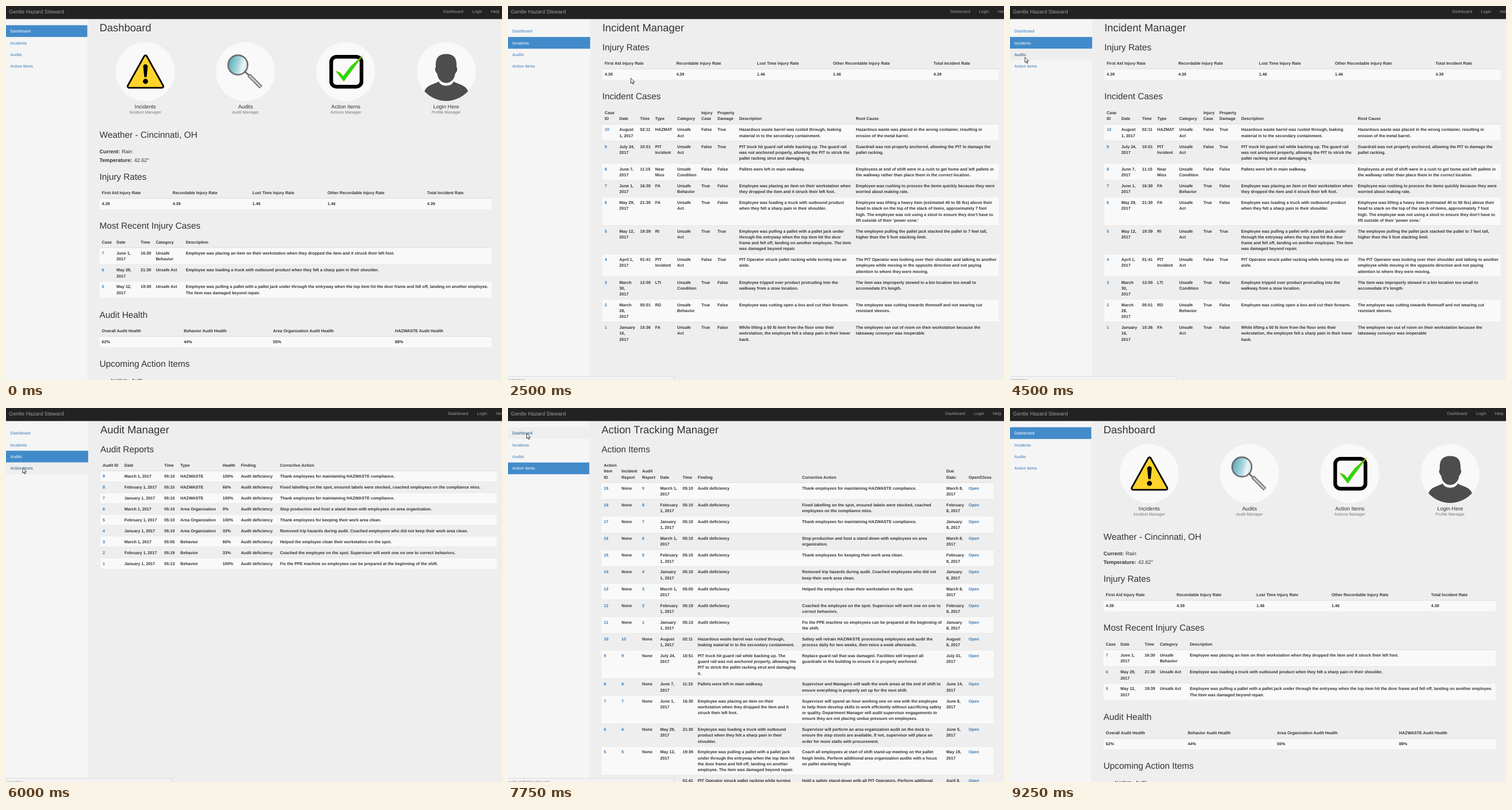
An HTML page with a canvas that plays this animation: 862 px wide and 650 px high, repeating every 9500 ms.

```html
<!DOCTYPE html>
<html lang="en">
<head>
<meta charset="utf-8">
<title>Dashboard</title>
<style>
html, body { margin: 0; width: 100%; height: 100%; overflow: hidden; background: #eee; }
canvas { display: block; }
</style>
</head>
<body>
<canvas id="stage" width="862" height="650"></canvas>
<script>
const ctx = document.getElementById('stage').getContext('2d');
const S = 0.5107, LINE = 20 * S, TICK = 250, LOOP = 9500;
const INK = '#333', LINK = '#337ab7', MUTED = '#777', STRIPE = '#f9f9f9';
const SANS = '"Liberation Sans", Arial, sans-serif';

// y is the middle of the capitals
function text(str, x, y, { size = 14, bold = false, color = INK, align = 'left', face = SANS } = {}) {
  ctx.save();
  ctx.translate(x, y + size * S * 0.358);
  ctx.scale(S, S);
  ctx.font = `${bold ? 'bold ' : ''}${size}px ${face}`;
  ctx.textRendering = 'geometricPrecision';
  ctx.textAlign = align;
  ctx.fillStyle = color;
  ctx.fillText(str, 0, 0);
  ctx.restore();
}

function rect(x, y, w, h, color) {
  ctx.fillStyle = color;
  ctx.fillRect(x, y, w, h);
}

function disc(x, y, r, color) {
  ctx.fillStyle = color;
  ctx.beginPath();
  ctx.arc(x, y, r, 0, Math.PI * 2);
  ctx.fill();
}

function poly(points) {
  ctx.beginPath();
  points.forEach(([x, y]) => ctx.lineTo(x, y));
  ctx.closePath();
}

function paint(fill, stroke, width) {
  if (fill) { ctx.fillStyle = fill; ctx.fill(); }
  if (stroke) { ctx.strokeStyle = stroke; ctx.lineWidth = width; ctx.stroke(); }
}

const h1 = (str, x) => text(str, x, 37.8, { size: 36 });
const h2 = (str, x, y) => text(str, x, y, { size: 30 });

// Cells are split by ";" and lines by "|"; y is the last header line
function table(left, right, y, cols, head, rows, links = []) {
  head.split(';').forEach((cell, i) => {
    const lines = cell.split('|');
    lines.forEach((s, k) => text(s, cols[i], y - (lines.length - 1 - k) * LINE, { bold: true }));
  });
  let top = y + 9.6;
  rows.forEach((row, r) => {
    const cells = row.split(';').map(c => c.split('|'));
    const h = (Math.max(...cells.map(c => c.length)) * 20 + 17) * S;
    if (r % 2 === 0) rect(left, top, right - left, h, STRIPE);
    rect(left, top - (r ? 0 : 0.5), right - left, r ? 0.5 : 1, '#ddd');
    cells.forEach((lines, i) => {
      const color = links.includes(i) && lines[0] !== 'None' ? LINK : INK;
      lines.forEach((s, k) => text(s, cols[i], top + 9.7 + k * LINE, { bold: true, color }));
    });
    top += h;
  });
}

const RATES = 'First Aid Injury Rate;Recordable Injury Rate;Lost Time Injury Rate;Other Recordable Injury Rate;Total Incident Rate';
const RATE_ROW = ['4.39;4.39;1.46;1.46;4.39'];

const RECENT = [
  '7;June 1,|2017;16:30;Unsafe|Behavior;Employee was placing an item on their workstation when they dropped the item and it struck their left foot.',
  '6;May 29,|2017;21:30;Unsafe Act;Employee was loading a truck with outbound product when they felt a sharp pain in their shoulder.',
  '5;May 12,|2017;19:39;Unsafe Act;Employee was pulling a pallet with a pallet jack under through the entryway when the top item hit the door frame and fell off, landing on another employee.|The item was damaged beyond repair.'
];

const CASES = [
  '10;August|1, 2017;02:11;HAZMAT;Unsafe|Act;False;True;Hazardous waste barrel was rusted through, leaking|material in to the secondary containment.;Hazardous waste was placed in the wrong container, resulting in|erosion of the metal barrel.',
  '9;July 24,|2017;10:51;PIT|Incident;Unsafe|Act;False;True;PIT truck hit guard rail while backing up. The guard rail|was not anchored properly, allowing the PIT to strick the|pallet racking strut and damaging it.;Guardrail was not properly anchored, allowing the PIT to damage the|pallet racking.',
  '8;June 7,|2017;11:15;Near|Miss;Unsafe|Condition;False;False;Pallets were left in main walkway.;Employees at end of shift were in a rush to get home and left pallets in|the walkway rather than place them in the correct location.',
  '7;June 1,|2017;16:30;FA;Unsafe|Behavior;True;False;Employee was placing an item on their workstation when|they dropped the item and it struck their left foot.;Employee was rushing to process the items quickly because they were|worried about making rate.',
  "6;May 29,|2017;21:30;FA;Unsafe|Act;True;False;Employee was loading a truck with outbound product|when they felt a sharp pain in their shoulder.;Employee was lifitng a heavy item (estimated 40 to 50 lbs) above their|head to stack on the top of the stack of items, approximately 7 foot|high. The employee was not using a stool to ensure they don't have to|lift outside of their 'power zone.'",
  '5;May 12,|2017;19:39;RI;Unsafe|Act;True;True;Employee was pulling a pallet with a pallet jack under|through the entryway when the top item hit the door|frame and fell off, landing on another employee. The item|was damaged beyond repair.;The employee pulling the pallet jack stacked the pallet to 7 feet tall,|higher than the 5 foot stacking limit.',
  '4;April 1,|2017;01:41;PIT|Incident;Unsafe|Act;False;True;PIT Operator struck pallet racking while turning into an|aisle.;The PIT Operator was looking over their shoulder and talking to another|employee while moving in the opposite direction and not paying|attention to where they were moving.',
  "3;March|30,|2017;12:00;LTI;Unsafe|Condition;True;False;Employee tripped over product protruding into the|walkway from a stow location.;The item was improperly stowed in a bin location too small to|accomodate it's length.",
  '2;March|28,|2017;05:01;RD;Unsafe|Behavior;True;False;Employee was cutting open a box and cut their forearm.;The employee was cutting towards themself and not wearing cut|resistant sleeves.',
  '1;January|16,|2017;15:36;FA;Unsafe|Act;True;False;While lifting a 50 lb item from the floor onto their|wokrstation, the employee felt a sharp pain in their lower|back.;The employee ran out of room on their workstation because the|takeaway conveyor was inoperable'
];

const THANKS = 'Thank employees for maintaining HAZWASTE compliance.';
// month, time, type, health, action, action as wrapped in the narrower table
const AUDITS = [
  ['March', '05:10', 'HAZWASTE', '100%', THANKS],
  ['February', '05:10', 'HAZWASTE', '66%', 'Fixed labelling on the spot, ensured labels were stocked, coached|employees on the compliance miss.'],
  ['January', '05:10', 'HAZWASTE', '100%', THANKS],
  ['March', '05:10', 'Area Organization', '0%', 'Stop production and host a stand down with employees on area|organization.'],
  ['February', '05:10', 'Area Organization', '100%', 'Thank employees for keeping their work area clean.'],
  ['January', '05:10', 'Area Organization', '33%', 'Removed trip hazards during audit. Coached employees who did not|keep their work area clean.'],
  ['March', '05:05', 'Behavior', '66%', 'Helped the employee clean their workstation on the spot.'],
  ['February', '05:19', 'Behavior', '33%', 'Coached the employee on the spot. Supervisor will work one on one to|correct behaviors.'],
  ['January', '05:13', 'Behavior', '100%', 'Fix the PPE machine so employees can be prepared at the beginning of|the shift.']
];
const REPORTS = AUDITS.map(([m, time, type, health, act], i) =>
  `${9 - i};${m} 1, 2017;${time};${type};${health};Audit deficiency;${act.replace('|', ' ')}`);

const wrapDate = (m, d) => m === 'March' ? `${m} ${d},|2017` : `${m}|${d}, 2017`;
const ACTIONS = AUDITS.map(([m, time, , , act], i) =>
  `${19 - i};None;${9 - i};${wrapDate(m, 1)};${time};Audit deficiency;${act};${wrapDate(m, 8)};Open`
).concat([
  '10;10;None;August|1, 2017;02:11;Hazardous waste barrel was rusted through,|leaking material in to the secondary containment.;Safety will retrain HAZWASTE processing employees and audit the|process daily for two weeks, then twice a week afterwards.;August|8, 2017;Open',
  '9;9;None;July 24,|2017;10:51;PIT truck hit guard rail while backing up. The|guard rail was not anchored properly, allowing the|PIT to strick the pallet racking strut and damaging|it.;Replace guard rail that was damaged. Facilities will inspect all|guardraile in the building to ensure it is properly anchored.;July 31,|2017;Open',
  '8;8;None;June 7,|2017;11:15;Pallets were left in main walkway.;Supervisor and Managers will walk the work areas at the end of shift to|ensure everything is properly set up for the next shift.;June 14,|2017;Open',
  '7;7;None;June 1,|2017;16:30;Employee was placing an item on their|workstation when they dropped the item and it|struck their left foot.;Supervisor will spend an hour working one on one with the employee|to help them develop skills to work efficiently without sacrificing safety|or quality. Department Manager will audit supervisor engagements to|ensure they are not placing undue pressure on employees.;June 8,|2017;Open',
  '6;6;None;May 29,|2017;21:30;Employee was loading a truck with outbound|product when they felt a sharp pain in their|shoulder.;Supervisor will perform an area organization audit on the dock to|ensure the step stools are available. If not, supervisor will place an|order for more stalls with procurement.;June 5,|2017;Open',
  '5;5;None;May 12,|2017;19:39;Employee was pulling a pallet with a pallet jack|under through the entryway when the top item hit|the door frame and fell off, landing on another|employee. The item was damaged beyond repair.;Coach all employees at start of shift stand-up meeting on the pallet|heigh limits. Perform additional area organization audits with a focus|on pallet stacking height.;May 19,|2017;Open',
  '4;4;None;April 1,|2017;01:41;PIT Operator struck pallet racking while turning|into an aisle.;Hold a safety stand-down with all PIT Operators. Perform additonal|training.;April 8,|2017;Open'
]);

function warningIcon() {
  ctx.lineJoin = 'round';
  poly([[242.4, 88.5], [214, 139.5], [270.8, 139.5]]);
  paint(null, '#000', 8);
  paint('#ffd42a', '#ffd42a', 2.4);
  ctx.beginPath();
  ctx.moveTo(238.4, 104);
  ctx.quadraticCurveTo(242.4, 98, 246.4, 104);
  ctx.lineTo(244.6, 122.5);
  ctx.quadraticCurveTo(242.4, 125.5, 240.2, 122.5);
  ctx.closePath();
  paint('#000');
  disc(242.4, 131, 4.4, '#000');
}

function lensIcon() {
  ctx.lineCap = 'butt';
  [['#444', 6.4, 0], ['#999', 5, 0.5], ['#d5d5d5', 1.8, 0.5]].forEach(([color, width, inset]) => {
    ctx.beginPath();
    ctx.moveTo(422 + inset, 120 + inset);
    ctx.lineTo(443 - inset, 141 - inset);
    paint(null, color, width);
  });
  ctx.beginPath();
  ctx.moveTo(415, 114);
  ctx.lineTo(423, 121);
  paint(null, '#777', 3);
  const glass = ctx.createLinearGradient(386, 98, 421, 107);
  glass.addColorStop(0, '#58a9b8');
  glass.addColorStop(0.5, '#a9d6de');
  glass.addColorStop(0.75, '#eaf6f8');
  glass.addColorStop(1, '#c3dfe4');
  disc(403, 102.5, 17, glass);
  paint(null, '#444', 2.4);
  paint(null, '#aaa', 0.8);
}

function checkIcon() {
  ctx.beginPath();
  ctx.roundRect(565.2, 88.2, 52.6, 52, 9);
  paint(null, '#000', 6.4);
  poly([[573, 113], [581, 116], [586, 122], [599, 105], [620, 86], [604, 108], [587, 131], [580, 122]]);
  paint('#1fdc12', '#a8b820', 1);
}

function personIcon() {
  const dark = '#4d4d4d';
  ctx.save();
  ctx.beginPath();
  ctx.arc(765, 114, 51, 0, Math.PI * 2);
  ctx.clip();
  ctx.beginPath();
  ctx.moveTo(752, 131);
  ctx.bezierCurveTo(746, 136, 731, 136, 727, 149);
  ctx.lineTo(740, 170);
  ctx.lineTo(790, 170);
  ctx.lineTo(803.5, 149);
  ctx.bezierCurveTo(799, 136, 784, 136, 778, 131);
  ctx.bezierCurveTo(775, 141, 755, 141, 752, 131);
  paint(dark);
  ctx.beginPath();
  ctx.moveTo(765, 83.5);
  ctx.bezierCurveTo(778, 83.5, 784, 90, 783, 106);
  ctx.bezierCurveTo(786, 110, 783, 115, 780.5, 118);
  ctx.bezierCurveTo(778, 139, 752, 139, 749.5, 118);
  ctx.bezierCurveTo(747, 115, 744, 110, 747, 106);
  ctx.bezierCurveTo(746, 90, 752, 83.5, 765, 83.5);
  paint(dark);
  ctx.restore();
}

const TILES = [
  [242, 'Incidents', 'Incident Manager', warningIcon],
  [416.2, 'Audits', 'Audit Manager', lensIcon],
  [590.6, 'Action Items', 'Actions Manager', checkIcon],
  [765, 'Login Here', 'Profile Manager', personIcon]
];

function dashboard() {
  const x = 162.5, r = 844;
  h1('Dashboard', x);
  TILES.forEach(([cx, title, sub, icon]) => {
    disc(cx, 114, 51.2, STRIPE);
    icon();
    text(title, cx, 174.5, { size: 18, align: 'center' });
    text(sub, cx, 184.8, { color: MUTED, align: 'center' });
  });
  h2('Weather - Cincinnati, OH', x, 224);
  text('Current:', x, 252.6, { size: 17.6, bold: true });
  text('Rain', 201, 252.6, { size: 17.6 });
  text('Temperature:', x, 267.4, { size: 17.6, bold: true });
  text('42.62°', 222.8, 267.4, { size: 17.6 });
  h2('Injury Rates', x, 296.3);
  table(x, r, 324.6, [166.6, 289.6, 428.3, 558.8, 731.8], RATES, RATE_ROW);
  h2('Most Recent Injury Cases', x, 382);
  table(x, r, 410.4, [166.6, 192, 234, 260.4, 312.4], 'Case;Date;Time;Category;Description', RECENT, [0]);
  h2('Audit Health', x, 536.2);
  table(x, r, 564.5, [166.6, 309, 464, 676],
    'Overall Audit Health;Behavior Audit Health;Area Organization Audit Health;HAZWASTE Audit Health', ['62%;44%;55%;88%']);
  h2('Upcoming Action Items', x, 621.8);
  text('Incident', 182.6, 650.2, { bold: true });
  text('Audit', 218.6, 650.2, { bold: true });
}

function incidents() {
  const x = 164, r = 853;
  h1('Incident Manager', x);
  h2('Injury Rates', x, 71.3);
  table(x, r, 99.6, [168, 292.4, 432.8, 564.8, 739.6], RATES, RATE_ROW);
  h2('Incident Cases', x, 157);
  table(x, r, 195.6, [168, 193.6, 229.6, 255.8, 294, 336, 364, 401.8, 604.6],
    'Case|ID;Date;Time;Type;Category;Injury|Case;Property|Damage;Description;Root Cause', CASES, [0]);
}

function audits() {
  h1('Audit Manager', 164);
  h2('Audit Reports', 164, 71.3);
  table(164, 853, 99.6, [168, 205.8, 275, 303, 376.6, 408.2, 476.2],
    'Audit ID;Date;Time;Type;Health;Finding;Corrective Action', REPORTS, [0]);
}

function actions() {
  h1('Action Tracking Manager', 162.5);
  h2('Action Items', 162.5, 71.3);
  table(162.5, 844, 120, [166.6, 197.3, 233, 264.6, 303.4, 329.8, 511, 761.8, 800.4],
    'Action|Item|ID;Incident|Report;Audit|Report;Date;Time;Finding;Corrective Action;Due|Date:;Open/Close', ACTIONS, [0, 1, 2, 8]);
}

const MENU = ['Dashboard', 'Incidents', 'Audits', 'Action Items'];
const PATHS = ['dashboard', 'incidents', 'audits', 'actions'];
const PAGES = [dashboard, incidents, audits, actions];
const MENU_TOP = 33.4, MENU_ROW = 40 * S;

// tick, x, y of the pointer tip
const PATH = [
  [1, 683, 262], [3, 372, 180], [4, 262, 142], [5, 217, 128], [7, 217, 128], [8, 213.5, 125.2], [10, 213.5, 125.2],
  [12, 180, 122], [15, 60, 97], [17, 26, 89], [19, 26, 89], [21, 44, 97], [23, 31, 105], [24, 29, 104],
  [26, 29, 104], [29, 36, 72], [31, 32.5, 44], [33, 32.5, 44], [34, 250, 200], [35, 588.7, 249.4], [36, 811, 296]
];

function pointerAt(tick) {
  const i = PATH.findIndex(p => p[0] >= tick);
  if (i < 0 || tick < PATH[0][0]) return null;
  if (PATH[i][0] === tick) return PATH[i].slice(1);
  const [a, b] = [PATH[i - 1], PATH[i]];
  const f = (tick - a[0]) / (b[0] - a[0]);
  return [a[1] + (b[1] - a[1]) * f, a[2] + (b[2] - a[2]) * f];
}

function pageAt(tick) {
  if (tick < 10 || tick >= 33) return 0;
  return tick < 19 ? 1 : tick < 26 ? 2 : 3;
}

const loading = tick => (tick >= 8 && tick <= 10) || tick === 18 || tick === 24 || tick === 25 || tick === 32;

function pointer([x, y]) {
  const k = 0.56;
  ctx.lineJoin = 'miter';
  poly([[0, 0], [0, 16.5], [3.8, 13], [6.4, 19], [8.8, 18], [6.3, 12.2], [11.6, 12.2]].map(([a, b]) => [x + a * k, y + b * k]));
  paint('#fff', '#111', 0.8);
}

function draw(tick) {
  const page = pageAt(tick), pos = pointerAt(tick);
  const wide = page === 1 || page === 2;
  const side = wide ? 142.8 : 141.3, shift = wide ? 8.6 : 0;
  let hover = -1;
  if (pos && pos[0] < side) hover = Math.floor((pos[1] - MENU_TOP) / MENU_ROW);
  if (hover >= MENU.length) hover = -1;

  rect(0, 0, 862, 650, '#eee');
  rect(0, 22, side, 628, '#f5f5f5');
  MENU.forEach((name, i) => {
    const y = MENU_TOP + i * MENU_ROW;
    const on = i === page, over = i === hover;
    if (on || over) rect(0, y, side, MENU_ROW, on ? '#428bca' : '#eee');
    text(name, 7.6, y + MENU_ROW / 2, { color: on ? '#fff' : over ? '#23527c' : LINK });
  });

  rect(0, 0, 862, 22, '#222');
  rect(0, 22, 862, 0.6, '#080808');
  text('Gentle Hazard Steward', 5, 9.8, { size: 18, color: '#9d9d9d' });
  [['Dashboard', 759.8], ['Login', 810], ['Help', 842.7]].forEach(([s, x]) =>
    text(s, x + shift, 9.9, { color: '#9d9d9d' }));

  PAGES[page]();

  const onTile = page === 0 && pos && Math.hypot(pos[0] - 242, pos[1] - 114) < 51;
  const target = onTile ? 1 : hover;
  if (loading(tick) || target >= 0) {
    rect(0, 643, 289, 7, '#c8c8c8');
    rect(0, 643.6, 288.4, 7, '#f2f2f2');
    const note = loading(tick) ? 'Connection' : `localhost:8000/${PATHS[target]}/`;
    text(note, -1.5, 649.4, { size: 11.5, color: '#666', face: '"Open Sans", sans-serif' });
  }
  if (pos) pointer(pos);
}

let shown = -1;
const start = performance.now();
function loop() {
  const tick = Math.floor(((performance.now() - start) % LOOP) / TICK);
  if (tick !== shown) draw(shown = tick);
  requestAnimationFrame(loop);
}
loop();
</script>
</body>
</html>
```
